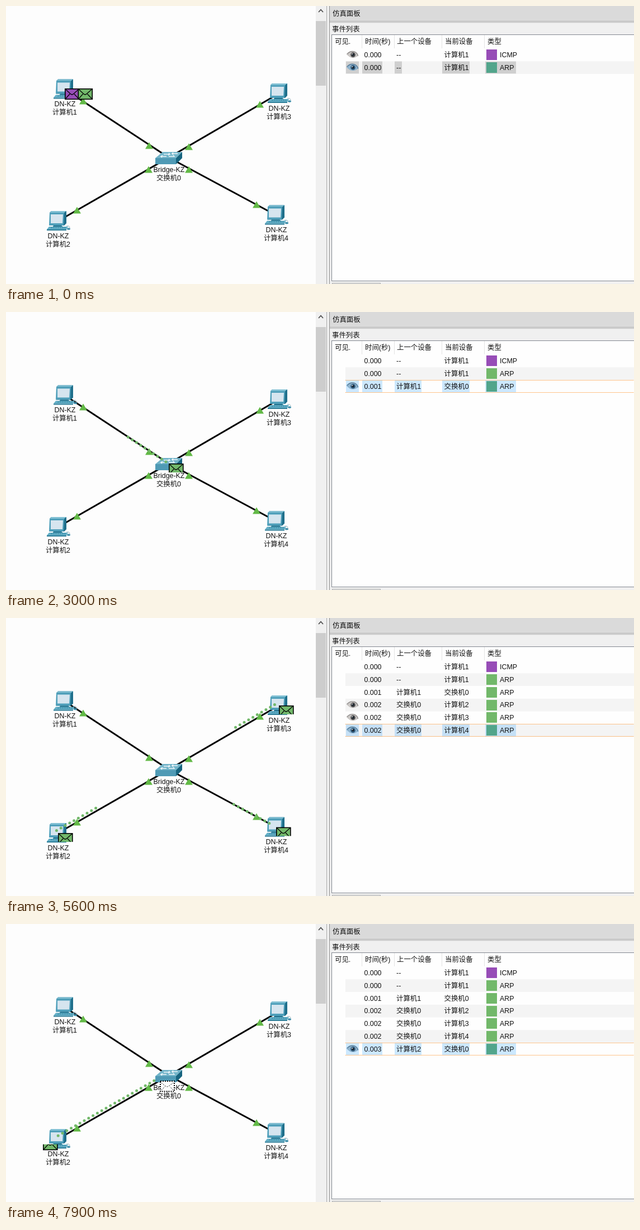
An HTML page that plays this animation: 1123x499 px, repeating every 8000 ms.

```html
<!DOCTYPE html>
<html lang="zh-CN">
<head>
<meta charset="utf-8">
<title>仿真面板</title>
<style>
html, body { margin: 0; width: 100%; height: 100%; overflow: hidden; background: #fdfdfd; }
svg { display: block; }
text { font: 12.4px "Liberation Sans", "Noto Sans CJK SC", "Noto Sans CJK", sans-serif; fill: #111; }
</style>
</head>
<body>
<svg id="stage" width="1123" height="499" viewBox="0 0 1123 499">
  <g id="network"></g>
  <g id="packets"></g>
  <g id="panel"></g>
  <g id="table"></g>
</svg>
<script>
const LOOP = 8000, STEP = 100;
const TRAVEL = 1087, STREAM = 1013, TOTAL = TRAVEL + STREAM;
const GREEN = '#72b86a', PURPLE = '#974db7', TEAL = '#52a58b';

const nodes = {
  pc1: { x: 105, y: 149.5, name: '计算机1' },
  pc2: { x: 93, y: 386, name: '计算机2' },
  pc3: { x: 488, y: 157, name: '计算机3' },
  pc4: { x: 483, y: 375.5, name: '计算机4' },
  hub: { x: 291, y: 272, name: '交换机0' }
};

// show/hide: life of the event; start: moment the packet leaves
const events = [
  { show: 1400, hide: 3900, start: 1313, from: 'pc1', to: ['hub'], shift: [-27, -1.5] },
  { show: 3900, hide: 6900, start: 3941, from: 'hub', to: ['pc2', 'pc3', 'pc4'], shift: [-27, 1] },
  { show: 6900, hide: 8000, start: 6901, from: 'pc2', to: ['hub'], shift: [-27, 0] }
];

const rows = [
  ['0.000', '--', '计算机1', 'ICMP'],
  ['0.000', '--', '计算机1', 'ARP'],
  ['0.001', '计算机1', '交换机0', 'ARP'],
  ['0.002', '交换机0', '计算机2', 'ARP'],
  ['0.002', '交换机0', '计算机3', 'ARP'],
  ['0.002', '交换机0', '计算机4', 'ARP'],
  ['0.003', '计算机2', '交换机0', 'ARP']
];

const $ = id => document.getElementById(id);
const rect = (x, y, w, h, fill, extra = '') =>
  `<rect x="${x}" y="${y}" width="${w}" height="${h}" fill="${fill}" ${extra}/>`;
const poly = (points, fill) => `<polygon points="${points}" fill="${fill}"/>`;
const path = (d, extra) => `<path d="${d}" fill="none" ${extra}/>`;
const text = (x, y, s, extra = '') => `<text x="${x}" y="${y}" ${extra}>${s}</text>`;
const at = (x, y, body) => `<g transform="translate(${x} ${y})">${body}</g>`;

function computer({ x, y }) {
  return at(x, y,
    poly('-15,-15 -12,-18 15,-18 15,4 11,8 -15,8', '#1f6f8b') +
    poly('-15,-15 -12,-18 15,-18 11,-15', '#7fbfd3') +
    poly('-15,-15 11,-15 10,8 -16,8', '#4f9fba') +
    poly('-13,-12 9,-12 8,4 -13,4', '#d6e5ef') +
    poly('-8,8 6,8 10,11 -10,11', '#1f6f8b') +
    poly('-16,10 18,10 15,15 -20,15', '#62aec6') +
    poly('-20,15 15,15 15,17 -20,17', '#2b7d98') +
    path('M-13 12H14', 'stroke="#2b7d98" stroke-dasharray="3 1"') +
    path('M15 9Q21 8 21 12', 'stroke="#8ba9b5"') +
    '<ellipse cx="19" cy="14" rx="3" ry="1.8" fill="#3b8ca8"/>');
}

function hub({ x, y }) {
  return at(x, y,
    poly('-24,1 -11,-10 24,-10 13,1', '#72b4c9') +
    poly('13,1 24,-10 24,1 13,12', '#17647f') +
    poly('-24,1 13,1 13,12 -24,12', '#4f9ab5') +
    path('M-9 -6H2l-2 -2m2 2l-3 2M16 -7H6l2 -2m-2 2l2 2M-4 -2H-14l3 -2m-3 2l2 2M0 -2H10l-2 -2',
      'stroke="#eef6fa" stroke-width="1.4"'));
}

function label({ x, y, name }, model) {
  const mid = 'text-anchor="middle"';
  const top = y + (model.length > 6 ? 25.5 : 30.5);
  return text(x + .5, top, model, mid) + text(x, top + 15, name, mid);
}

function drawNetwork() {
  const pcs = ['pc1', 'pc2', 'pc3', 'pc4'].map(k => nodes[k]);
  const c = nodes.hub;
  const lights = [[138, 171], [256, 251], [327, 253], [454, 177],
                  [127, 367], [255, 294], [327, 294], [448, 357]];
  $('network').innerHTML =
    pcs.map(p => path(`M${p.x} ${p.y}L${c.x} ${c.y}`, 'stroke="#000" stroke-width="3"')).join('') +
    pcs.map(computer).join('') + hub(c) +
    pcs.map(p => label(p, 'DN-KZ')).join('') + label(c, 'Bridge-KZ') +
    lights.map(([x, y]) => poly(`${x},${y - 6.5} ${x + 7},${y + 5.5} ${x - 7},${y + 5.5}`, '#62b946')).join('');
}

function drawPanel() {
  $('panel').innerHTML =
    rect(554, 0, 18, 499, '#f0f0f0') + rect(554, 27, 18, 116, '#cdcdcd') +
    path('M559 11L563 6.5L567 11', 'stroke="#505050" stroke-width="1.8"') +
    rect(572, 0, 551, 499, '#f0f0f0') + rect(573, 0, 1, 499, '#a8a8a8') +
    rect(578, 0, 545, 27, '#dadada') + rect(578, 0, 1, 499, '#8c8c8c') +
    rect(579, 27, 544, 1, '#a8a8a8') + rect(579, 29, 544, 1, '#b4b4b4') +
    text(584, 18, '仿真面板') + text(583, 45.5, '事件列表');
}

function envelope(x, y, color, top = 0, bottom = 1) {
  const a = top ? top * 20 : -1, b = bottom < 1 ? bottom * 20 : 21;
  const body = rect(.8, .8, 25, 18.5, color, 'stroke="#000" stroke-width="1.6"') +
    path('M1 1L10 9.5Q13 12.5 16 9.5L25.5 1M1 19L9 10M25.5 19L17 10', 'stroke="#000" stroke-width="1.2"');
  return `<svg x="${x - 1}" y="${y + a}" width="29" height="${b - a}" viewBox="-1 ${a} 29 ${b - a}">${body}</svg>`;
}

function ghost(x, y) {
  const dash = 'stroke="#000" stroke-dasharray="2 2"';
  return at(x, y, rect(1, 1, 25, 18.5, '#fdfdfd', dash + ' stroke-width="2"') +
    path('M3 4L10 10Q13 12 16 10L24 4M3 17L9 11M24 17L18 11', dash));
}

function trail(a, b, age) {
  const len = Math.hypot(b.x - a.x, b.y - a.y), speed = len / TRAVEL;
  const head = age * speed, tail = Math.max(4, (age - STREAM) * speed);
  let out = '';
  for (let d = head - 6; d >= tail; d -= 9) {
    if (d > len) continue;
    const x = a.x + (b.x - a.x) * d / len - 5, y = a.y + (b.y - a.y) * d / len - 3;
    out += `<circle cx="${x.toFixed(1)}" cy="${y.toFixed(1)}" r="2.5" fill="${GREEN}"/>`;
  }
  return out;
}

function drawPackets(t) {
  const e = events.find(e => t >= e.show && t < e.hide);
  if (!e) {
    $('packets').innerHTML = envelope(105, 148, PURPLE) + envelope(128.5, 148, GREEN);
    return;
  }
  const age = Math.max(0, t - e.start), p = age / TRAVEL, part = Math.min(1, age / TOTAL);
  const a = nodes[e.from];
  let out = e.to.map(k => trail(a, nodes[k], age)).join('');
  if (age < STREAM) out += envelope(a.x + e.shift[0], a.y + e.shift[1], GREEN, part);
  for (const k of e.to) {
    const b = nodes[k];
    if (p < 1) {
      out += ghost(Math.round(a.x + (b.x - a.x) * p), Math.round(a.y + (b.y - a.y) * p));
    } else {
      out += envelope(b.x, b.y, GREEN, 0, part);
      if (part === 1 && (k === 'pc3' || k === 'pc4'))
        out += at(b.x + 4, b.y + 14, poly('-3,1 0,-2 4,-1 1,3', '#a3241c'));
    }
  }
  $('packets').innerHTML = out;
}

function eye(y, selected) {
  return at(619.5, y,
    `<path d="M-10 0Q-4 -8 4 -5Q9 -3 10 2Q2 8 -5 4Z" fill="${selected ? '#8fb3cd' : '#c9c6c4'}"/>` +
    path('M-10 -1Q-4 -8 4 -5.500Q9 -3 10 2', `stroke="${selected ? '#547b98' : '#8d8987'}" stroke-width="1.4"`) +
    `<circle cx="1" cy="0" r="4.300" fill="${selected ? '#315a7b' : '#4c4c4e'}"/>` +
    '<circle cx="1" cy="0" r="2" fill="#16202a"/><circle cx="-.5" cy="-1.500" r="1" fill="#eee"/>');
}

function drawRow(row, i, visible, selected, early) {
  const y = 76.4 + 22.8 * i, mid = y + 11.2, base = mid + 4.4;
  const [time, prev, now, type] = row;
  let out = i % 2 ? rect(607, y, 516, 22.8, '#f4f4f4') : '';
  if (selected) {
    const fill = early ? '#cfcfcf' : i % 2 ? '#c5e0f6' : '#cce8ff';
    const cells = [[608, 23], [637, 36], [695, prev === '--' ? 13 : 48], [780, 49], [857, 55]];
    out += cells.map(([x, w]) => rect(x, y + .3, w, 21.8, fill)).join('');
    if (!early) out += [y - .4, y + 22].map(v =>
      path(`M607 ${Math.round(v) + .5}H1123`, 'stroke="#ff8c1a" stroke-dasharray="1 1"')).join('');
  }
  if (visible) out += eye(mid, selected);
  const color = selected ? TEAL : type === 'ARP' ? GREEN : PURPLE;
  return out + text(640.5, base, time) + text(698, base, prev) + text(783.5, base, now) +
    rect(859, Math.round(mid - 9.5), 19, 19, color) + text(883, base, type);
}

function drawTable(t) {
  const early = t < 1400;
  const [first, count] = early ? [0, 2] : t < 3900 ? [2, 3] : t < 6900 ? [3, 6] : [6, 7];
  const tall = events.some(e => t >= e.show && t < e.show + 900);
  const bottom = tall ? 497 : 493;
  const heads = [[588, '可见.'], [642, '时间(秒)'], [699, '上一个设备'], [785, '当前设备'], [861, '类型']];
  let out = rect(582.5, 51.5, 545, bottom - 51, '#fefefe', 'stroke="#828790"');
  if (!tall) out += rect(583.5, 497.5, 86, 5, '#e4e4e4', 'stroke="#adadad"');
  out += heads.map(([x, s]) => text(x, 68, s)).join('');
  out += [636, 694, 779, 855].map(x => rect(x, 52, 1, 24, '#e3e3e3')).join('');
  out += rows.slice(0, count).map((r, i) => drawRow(r, i, i >= first, i === count - 1, early)).join('');
  $('table').innerHTML = out;
}

let shown = -1;
const begin = performance.now();
function frame() {
  const t = Math.floor((performance.now() - begin) % LOOP / STEP) * STEP;
  if (t !== shown) {
    shown = t;
    drawPackets(t);
    drawTable(t);
  }
  requestAnimationFrame(frame);
}

drawNetwork();
drawPanel();
frame();
</script>
</body>
</html>
```
